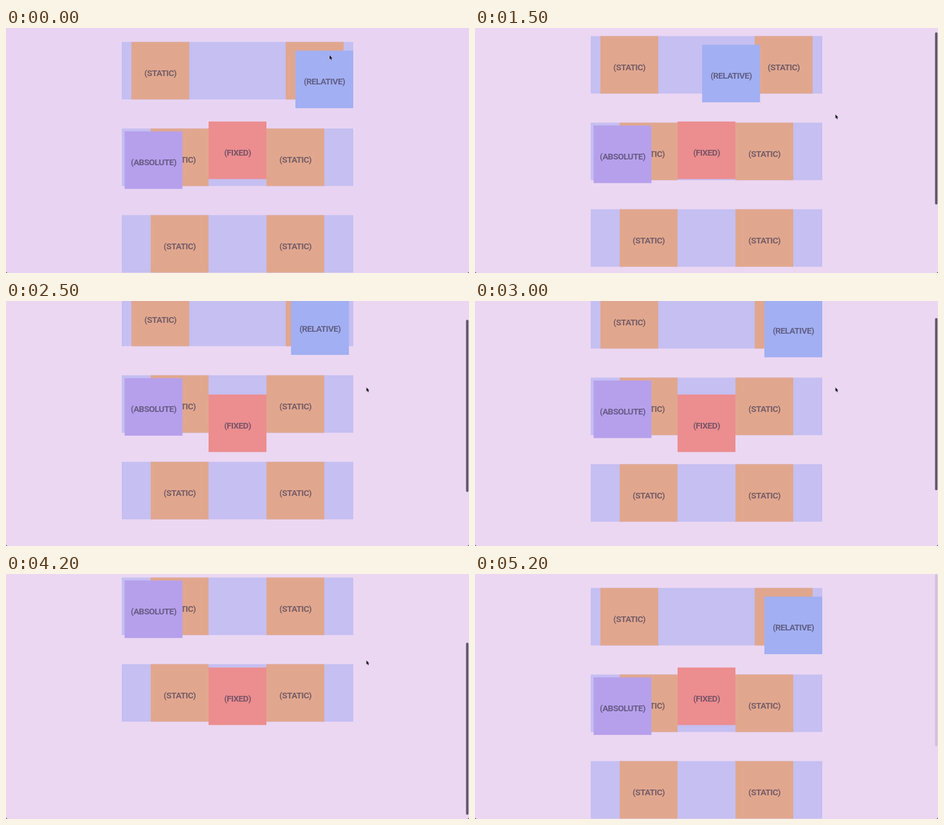
Write an HTML page that moves like this. It is 720 px wide and 382 px high and loops after 5.3 s.

```html
<!DOCTYPE html>
<html lang="en">
<head>
<meta charset="utf-8">
<title>CSS positions</title>
<style>
  html, body { margin: 0; width: 100%; height: 100%; overflow: hidden; background: #ebd7f2; }
  svg { display: block; width: 100vw; height: 100vh; }
  text {
    font: 700 13.5px Roboto, "Liberation Sans", sans-serif;
    letter-spacing: -.6px;
    text-anchor: middle;
    fill: #433a55;
    fill-opacity: .67;
  }
</style>
</head>
<body>
<svg id="stage" viewBox="0 0 720 382"></svg>
<script>
const LOOP = 5300, STEP = 100;
const ROW_TOP = 21.7, ROW_GAP = 135, BOX_W = 90, BOX_H = 89.7;
const THUMB_RATIO = 0.706, THUMB_H = 268.5;
const COLORS = {
  row: '#c5bff2', static: '#e1a78e', relative: '#a2aff2',
  absolute: '#b6a0ec', fixed: '#ec8d8f'
};
const stage = document.getElementById('stage');

function add(parent, name, attrs) {
  const node = document.createElementNS('http://www.w3.org/2000/svg', name);
  for (const key in attrs) node.setAttribute(key, attrs[key]);
  return parent.appendChild(node);
}

function move(node, x, y) {
  node.setAttribute('transform', `translate(${x.toFixed(2)} ${y.toFixed(2)})`);
}

function addBox(parent, kind, x, y) {
  const box = add(parent, 'g', {});
  add(box, 'rect', { width: BOX_W, height: BOX_H, fill: COLORS[kind] });
  add(box, 'text', { x: BOX_W / 2, y: 53.2 }).textContent = `(${kind.toUpperCase()})`;
  move(box, x, y);
  return box;
}

const backdrop = add(stage, 'rect', { width: 720, height: 382 });
const page = add(stage, 'g', {});
[[195, 435], [225, 405], [225, 405]].forEach((columns, i) => {
  const y = ROW_TOP + i * ROW_GAP;
  add(page, 'rect', { x: 180, y, width: 360, height: BOX_H, fill: COLORS.row });
  columns.forEach(x => addBox(page, 'static', x, y));
});
const relative = addBox(page, 'relative', 450, 35.3);
addBox(page, 'absolute', 184.4, 161.2);
addBox(stage, 'fixed', 315, 145.8);

const thumb = add(stage, 'rect', { x: 715.4, width: 3.8, height: THUMB_H, rx: 1.9 });
const cursor = add(stage, 'path', {
  d: 'M0 0V6.3L1.4 5L2.5 7.4L3.6 6.9L2.6 4.6H4.5Z',
  fill: '#17131c', stroke: '#f4edf7', 'stroke-width': .5, 'paint-order': 'stroke'
});
// Rounded window corners
add(stage, 'path', { d: 'M0 379V382H3Q0 382 0 379ZM720 379V382H717Q720 382 720 379Z', fill: '#3c3741' });

const clamp = u => Math.min(1, Math.max(0, u));
const progress = (t, start, end) => clamp((t - start) / (end - start));
const smooth = u => u * u * (3 - 2 * u);
const lerp = (a, b, u) => a + (b - a) * u;

// Each swipe: start time, end time, distance
const swipes = [[1300, 2050, 52], [2300, 2750, -26.5], [2800, 3900, 134.5], [4050, 5100, -160]];
const scrollAt = t => swipes.reduce(
  (sum, [start, end, distance]) => sum + distance * smooth(progress(t, start, end)), 0);

function render(t) {
  const scroll = scrollAt(t);
  const slide = t < 1000 ? 1 : progress(t, 1075, 2575);
  const glide = smooth(progress(t, 950, 1450));

  backdrop.setAttribute('fill', t < 1000 ? '#e8d4f2' : '#ebd7f2');
  move(page, 0, -scroll);
  move(relative, lerp(315, 450, slide), 35.3);
  move(cursor, lerp(503.2, 560.5, glide), lerp(42.6, 134.8, glide));
  cursor.setAttribute('visibility', t < 5200 ? 'visible' : 'hidden');
  thumb.setAttribute('visibility', t < 1500 ? 'hidden' : 'visible');
  thumb.setAttribute('y', (scroll * THUMB_RATIO + .3).toFixed(2));
  thumb.setAttribute('fill', t < 5200 ? '#62566a' : '#d2c0d9');
}

const origin = performance.now();
function tick() {
  const t = (performance.now() - origin) % LOOP;
  render(Math.floor(t / STEP) * STEP);
  requestAnimationFrame(tick);
}
tick();
</script>
</body>
</html>
```
